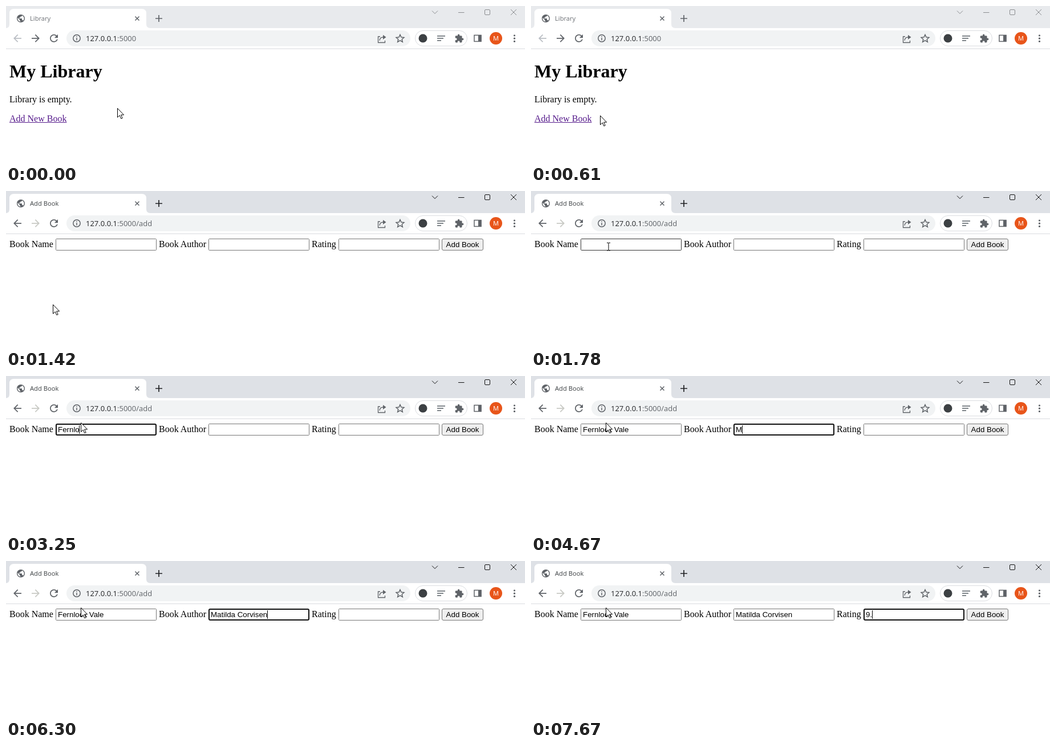
An HTML page for the animation above (8000 ms loop, 910x277 px).

```html
<!DOCTYPE html>
<html lang="en">
<head>
<meta charset="utf-8">
<title>Library</title>
<style>
  html, body { margin: 0; width: 100%; height: 100%; overflow: hidden; background: #fff; }
  svg { display: block; width: 910px; height: 277px; }
  .ui { font: 13px "Open Sans", "Noto Sans", sans-serif; }
  .small { font-size: 11.2px; }
  .page { font: 16px "Liberation Serif", "Times New Roman", serif; }
  .page h1, .head { font-size: 32px; font-weight: bold; }
  .form { font: 13.333px "Liberation Sans", Arial, sans-serif; }
  .line { fill: none; stroke: #5f6368; stroke-width: 1.5; }
  .icon { fill: #5f6368; }
</style>
</head>
<body>
<svg viewBox="0 0 910 277">
  <defs>
    <path id="arrow" d="M20 11H7.83l5.59-5.59L12 4l-8 8 8 8 1.41-1.41L7.83 13H20z"/>
  </defs>

  <!-- Title bar -->
  <rect id="bar" width="910" height="39"/>
  <path fill="#fff" d="M0 39q6 0 6-7V13q0-8 8-8H238q8 0 8 8V32q0 7 7 7z"/>
  <path class="icon" transform="translate(17.6 13.6) scale(.7)" d="M12 2C6.48 2 2 6.48 2 12s4.48 10 10 10 10-4.48 10-10S17.52 2 12 2zm-1 17.93c-3.95-.49-7-3.85-7-7.93 0-.62.08-1.21.21-1.79L9 15v1c0 1.1.9 2 2 2zm6.9-2.54c-.26-.81-1-1.39-1.9-1.39h-1v-3c0-.55-.45-1-1-1H8v-2h2c.55 0 1-.45 1-1V7h2c1.1 0 2-.9 2-2v-.41c2.93 1.19 5 4.06 5 7.41 0 2.08-.8 3.97-2.1 5.39z"/>
  <text id="title" class="ui small" x="42" y="26"></text>
  <path class="line" d="M226.5 18.5l7 7m0-7l-7 7"/>
  <path id="plus" class="line" style="stroke-width:1.7" d="M262 22h12m-6-6v12"/>
  <path id="controls" fill="none" d="M747 8.500l5 5 5-5M793 11.500h10.500M841 6.500h6q1.500 0 1.500 1.500v6q0 1.500-1.500 1.500h-6q-1.500 0-1.500-1.500v-6q0-1.500 1.500-1.500zM885 6l10 10m0-10l-10 10"/>

  <!-- Toolbar -->
  <path stroke="#d9dbdf" d="M0 75.500h910"/>
  <use id="back" href="#arrow" transform="translate(9.600 46.600) scale(.87)"/>
  <use id="forward" href="#arrow" transform="translate(62.400 46.600) scale(-.87 .87)"/>
  <path class="icon" transform="translate(73.600 46.600) scale(.87)" d="M17.650 6.350C16.200 4.900 14.210 4 12 4c-4.420 0-7.990 3.580-7.990 8s3.570 8 7.990 8c3.730 0 6.840-2.550 7.730-6h-2.080c-.82 2.330-3.040 4-5.650 4-3.310 0-6-2.690-6-6s2.690-6 6-6c1.660 0 3.140.69 4.220 1.780L13 11h7V4z"/>
  <rect x="106" y="43" width="603" height="28" rx="14" fill="#f1f3f4"/>
  <circle class="line" cx="124" cy="57" r="6.200"/>
  <path class="line" d="M124 56v4.500m0-7.500v1.600"/>
  <text class="ui" x="140" y="62" fill="#202124">127.0.0.1<tspan id="path" fill="#5f6368"></tspan></text>
  <path class="line" style="stroke-width:1.300" d="M656 54h-3.500v10.500h12V61M655 61q.5-6 6.500-6"/>
  <path class="icon" d="M661 51l5.500 4-5.500 4z"/>
  <path class="line" d="M691 50.500l2 4.500 4.900.5-3.700 3.200 1.100 4.800-4.300-2.600-4.300 2.600 1.100-4.800-3.700-3.200 4.900-.5z"/>
  <rect x="717.500" y="43.500" width="91" height="27" rx="13.500" fill="#fff" stroke="#dadce0"/>
  <circle cx="731" cy="57" r="7.500" fill="#3c4043"/>
  <path stroke="#80868b" stroke-width="2" d="M756 53h14M756 57h11M756 61h7"/>
  <path class="icon" transform="translate(786.300 49) scale(.7)" d="M20.500 11H19V7c0-1.100-.9-2-2-2h-4V3.500C13 2.120 11.880 1 10.500 1S8 2.120 8 3.500V5H4c-1.100 0-2 .9-2 2v3.800h1.500c1.490 0 2.700 1.210 2.700 2.700s-1.210 2.700-2.700 2.700H2V20c0 1.100.9 2 2 2h3.800v-1.500c0-1.490 1.210-2.700 2.700-2.700s2.700 1.210 2.700 2.700V22H17c1.100 0 2-.9 2-2v-4h1.500c1.380 0 2.500-1.120 2.500-2.500S21.880 11 20.500 11z"/>
  <rect class="line" x="821" y="51.500" width="12" height="11"/>
  <path class="icon" d="M828 51h5.500v12H828z"/>
  <circle cx="859" cy="57" r="11" fill="#e8551a"/>
  <text class="ui small" x="859" y="61" fill="#fff" text-anchor="middle">M</text>
  <g class="icon"><circle cx="891.500" cy="52" r="1.600"/><circle cx="891.500" cy="57.200" r="1.600"/><circle cx="891.500" cy="62.400" r="1.600"/></g>

  <!-- Library page -->
  <g id="library" class="page">
    <text class="head" x="6" y="126">My Library</text>
    <text x="6" y="170">Library is empty.</text>
    <circle id="click" r="11" fill="#fbf36b"/>
    <g id="link">
      <text x="6" y="204">Add New Book</text>
      <path d="M6 205.500h100.500" stroke="currentColor"/>
      <path id="edge" d="M106.500 191v16" stroke="currentColor"/>
    </g>
  </g>

  <!-- Add page -->
  <g id="add">
    <g class="page">
      <text x="6" y="99">Book Name</text>
      <text x="268" y="99">Book Author</text>
      <text x="536" y="99">Rating</text>
    </g>
    <rect x="764.500" y="84.500" width="72" height="20" rx="2.500" fill="#efefef" stroke="#767676"/>
    <text class="form" x="800.500" y="99" text-anchor="middle">Add Book</text>
    <g id="fields" class="form"></g>
    <rect id="caret" y="87" width="1" height="15"/>
  </g>

  <g id="status">
    <path fill="#dee1e6" d="M0 258h107q4 0 4 4v15H0z"/>
    <text class="ui small" x="3" y="273" fill="#5f6368">127.0.0.1:5000/add</text>
  </g>
  <circle id="press" cx="136" cy="98" r="11" fill="#fbf36b" style="mix-blend-mode:multiply"/>
  <path id="pointer" fill="#fff" stroke="#000" d="M.5.5V16.500l3.700-3.500 2.600 5.800 2.400-1-2.600-5.700h5z"/>
  <path id="beam" fill="none" stroke="#000" d="M-3-6.500h2.500l.5.500.5-.5H3M0-6V6.500M-3 7h2.500l.5-.5.5.5H3"/>
</svg>

<script>
const LOOP = 8000, ACTIVE = 960, LOADED = 1120;
const $ = id => document.getElementById(id);
const show = (id, on) => $(id).style.display = on ? "" : "none";
const set = (el, attrs) => { for (const k in attrs) el.setAttribute(k, attrs[k]); };

// Each field: position, text, focus time and the time of every keystroke
const fields = [
  { x: 87, text: "Fernlock Vale", focus: 1860,
    keys: [2650, 2850, 2910, 2980, 3050, 3250, 3300, 3460, 3610, 3910, 4060, 4160, 4270] },
  { x: 355, text: "Matilda Corvisen", focus: 4420,
    keys: [4670, 4880, 4950, 5030, 5110, 5180, 5260, 5330, 5480, 5690, 5760, 5840, 6000, 6100, 6200, 6300] },
  { x: 583, text: "9.", focus: 6500, keys: [7360, 7670] }
];
for (const f of fields) {
  const make = tag => $("fields").appendChild(document.createElementNS("http://www.w3.org/2000/svg", tag));
  f.box = make("rect");
  f.label = make("text");
  set(f.label, { x: f.x + 4, y: 99 });
}

const pen = document.createElement("canvas").getContext("2d");
pen.font = '13.333px "Liberation Sans", Arial, sans-serif';

// Pointer moves: start, end, from, to
const moves = [
  [150, 910, [195, 180], [82, 200]],
  [1420, 1740, [82, 200], [136, 98]],
  [1940, 2040, [136, 98], [131, 82]]
];

function pointerAt(t) {
  const [start, end, from, to] = moves.findLast(m => t >= m[0]) || moves[0];
  const u = Math.min(1, Math.max(0, (t - start) / (end - start)));
  const e = u * u * (3 - 2 * u);
  return from.map((v, i) => v + (to[i] - v) * e);
}

function drawChrome(t) {
  const active = t >= ACTIVE, loaded = t >= LOADED;
  set($("bar"), { fill: active ? "#dee1e6" : "#e8eaed" });
  set($("title"), { fill: active ? "#3c4043" : "#6b6f74" });
  set($("controls"), { stroke: active ? "#111" : "#8a8c8f" });
  $("plus").style.stroke = active ? "#202124" : "#5f6368";
  $("title").textContent = loaded ? "Add Book" : "Library";
  $("path").textContent = loaded ? ":5000/add" : ":5000";
  set($("back"), { fill: loaded ? "#5f6368" : "#babec4" });
  set($("forward"), { fill: loaded ? "#c8c9c4" : "#5f6368" });
}

function drawFields(t, hover) {
  const current = fields.findLast(f => t >= f.focus);
  for (const f of fields) {
    const on = f === current, w = on ? 2 : 1;
    set(f.box, {
      x: f.x + w / 2, y: 84 + w / 2, width: 177 - w, height: 21 - w, rx: on ? 2 : 1, fill: "#fff",
      stroke: on ? "#101010" : hover && f === fields[0] ? "#333" : "#767676", "stroke-width": w
    });
    f.typed = f.text.slice(0, f.keys.filter(k => t >= k).length);
    f.label.textContent = f.typed;
  }
  show("caret", current);
  if (!current) return;
  const last = current.keys.findLast(k => t >= k) || current.focus;
  show("caret", (t - last) % 1060 < 530);
  set($("caret"), { x: Math.floor(current.x + 4 + pen.measureText(current.typed).width) });
}

function draw(t) {
  const [x, y] = pointerAt(t);
  const clicking = t >= ACTIVE && t < LOADED;
  const inField = t >= LOADED && x > 87 && x < 264 && y > 84 && y < 105;
  const at = { transform: `translate(${Math.round(x)} ${Math.round(y)})` };

  drawChrome(t);
  show("library", t < LOADED);
  show("add", t >= LOADED);
  show("click", clicking);
  show("edge", clicking);
  set($("click"), { cx: x - 1, cy: y + 1 });
  set($("link"), { fill: clicking ? "#e00" : "#551a8b", color: clicking ? "#e00" : "#551a8b" });
  drawFields(t, inField);

  show("status", t < 1420 && x < 107 && y > 189);
  show("press", t >= 1830 && t < 1940);
  show("pointer", !inField);
  show("beam", inField);
  set($("pointer"), at);
  set($("beam"), at);
}

function frame(now) {
  draw(now % LOOP);
  requestAnimationFrame(frame);
}
draw(0);
requestAnimationFrame(frame);
</script>
</body>
</html>
```
